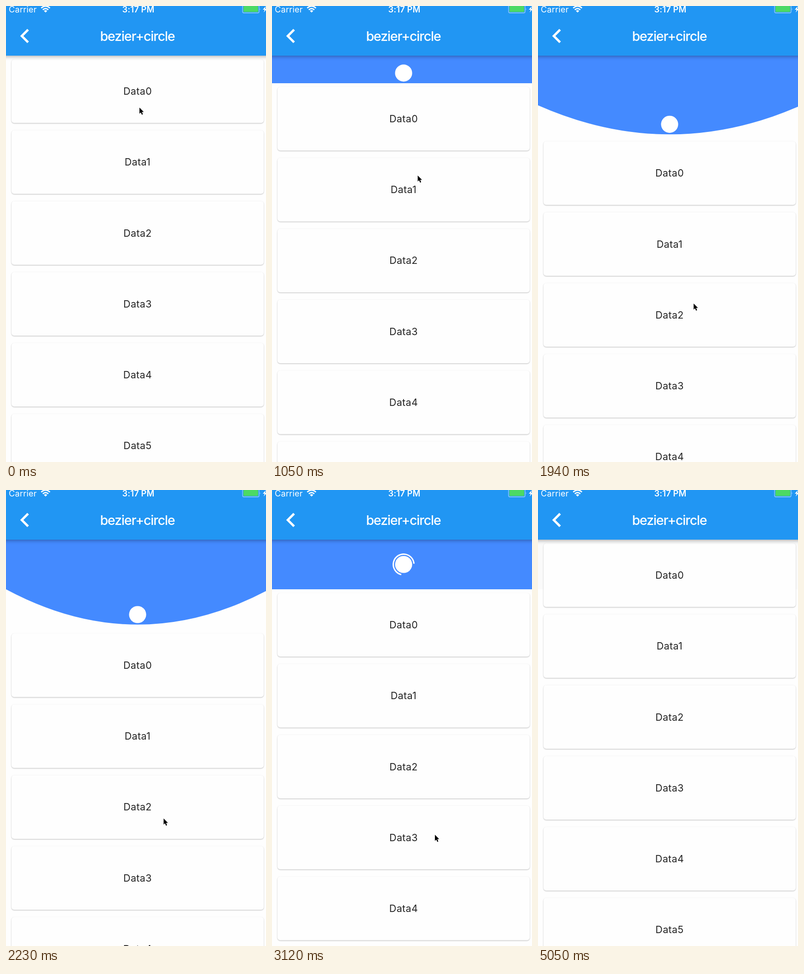
An HTML page for the animation above (5.8 s loop, 565x992 px).

```html
<!DOCTYPE html>
<html lang="en">
<head>
<meta charset="utf-8">
<title>bezier+circle</title>
<style>
  html, body { margin: 0; width: 100%; height: 100%; overflow: hidden; background: #fefefe; }
  svg { display: block; width: 565px; height: 992px; font-family: Inter, Roboto, sans-serif; }
  .card rect { fill: #fefefe; filter: drop-shadow(0 1.5px 1px rgba(0,0,0,.27)); }
  .card text { font-size: 21.4px; letter-spacing: .4px; fill: #242424; text-anchor: middle; }
  .bar { filter: drop-shadow(0 2px 4px rgba(0,0,0,.32)); }
  .status { font-size: 18.3px; fill: #fff; letter-spacing: .15px; }
  .title { font-size: 28.5px; font-weight: 500; letter-spacing: -1.15px; fill: #fff; text-anchor: middle; }
</style>
</head>
<body>
<svg viewBox="0 0 565 992">
  <rect width="565" height="992" fill="#fefefe"/>
  <rect id="stale" y="108" width="565" height="108" fill="#fafafa"/>
  <path id="band" fill="#448aff"/>
  <g id="ball">
    <circle r="18.6" fill="#fff"/>
    <circle id="ring" r="22.5" fill="none" stroke="#fff" stroke-width="3" pathLength="360"/>
  </g>
  <g id="list"></g>
  <rect class="bar" x="-20" y="-20" width="605" height="128" fill="#2196f3"/>
  <g class="status">
    <text x="6" y="13.5">Carrier</text>
    <text x="252.5" y="13.5" font-weight="600">3:17 PM</text>
  </g>
  <g fill="none" stroke="#fff" stroke-width="2.8">
    <path d="M76.5 4.5Q86 -4 95.5 4.5M80 8.3Q86 3 92 8.3"/>
    <path d="M82.3 10.5Q86 7.5 89.7 10.5L86 14.3z" fill="#fff" stroke="none"/>
  </g>
  <rect x="514" y="-1.5" width="36" height="16.5" rx="3" fill="none" stroke="#fff" stroke-opacity=".55" stroke-width="1.3"/>
  <rect x="516" y="0" width="32" height="13" rx="1.5" fill="#4cd964"/>
  <path d="M551.5 4.5q2 2.5 0 5z" fill="#fff" fill-opacity=".55"/>
  <path d="M565 0L558 8h4l-2 6 7-8h-4z" fill="#fff"/>
  <path d="M48 51.5L34.3 65.2 48 79" fill="none" stroke="#fff" stroke-width="5"/>
  <text class="title" x="285.5" y="76">bezier+circle</text>
  <path id="cursor" d="M0 0V13.2L3 10.4 5.2 15.6 7.5 14.6 5.3 9.6H9.4z" fill="#000" stroke="#fff" stroke-width="1" paint-order="stroke"/>
</svg>
<script>
const LOOP = 5800, STEP = 148.5;
const BAR = 108, REST = 108, PULL = 88;
const RELEASE = 2227, SPIN = 2353, DONE = 4250, CLOSE = 4540, CLOSED = 5000;
const $ = id => document.getElementById(id);

const pullKeys = [[280, 0], [742, 27.5], [1040, 60], [1485, 122.5], [2227, 196]];
const cursorX = [[0, 290], [742, 307.5], [1485, 330], [2227, 342.5], [3118, 354], [3420, 360], [4010, 496]];
const cursorY = [[0, 221], [742, 291], [1485, 510], [2227, 714.5], [3118, 750], [3420, 760], [4010, 1010]];

$('list').innerHTML = [0, 1, 2, 3, 4, 5].map(i =>
  `<g class="card" transform="translate(0 ${116 + 154.25 * i})">
    <rect x="12" width="548" height="138.5" rx="6"/><text x="286" y="77">Data${i}</text></g>`).join('');

// Smooth curve through [time, value] keys, at rest at both ends
function track(keys, t) {
  const last = keys.length - 1;
  if (t <= keys[0][0]) return keys[0][1];
  if (t >= keys[last][0]) return keys[last][1];
  const i = keys.findIndex(k => k[0] > t) - 1;
  const slope = j => j < 1 || j >= last ? 0 :
    (keys[j + 1][1] - keys[j - 1][1]) / (keys[j + 1][0] - keys[j - 1][0]);
  const [t0, a] = keys[i], [t1, b] = keys[i + 1];
  const d = t1 - t0, u = (t - t0) / d, v = 1 - u;
  return a * v * v * (1 + 2 * u) + b * u * u * (1 + 2 * v)
    + d * u * v * (slope(i) * v - slope(i + 1) * u);
}

// Critically damped return from 1 to 0
const spring = ms => {
  const x = Math.max(0, ms) * .014;
  return (1 + x) * Math.exp(-x);
};

// cubic-bezier(.4, 0, .2, 1)
function ease(x) {
  if (x <= 0) return 0;
  if (x >= 1) return 1;
  let lo = 0, hi = 1, u;
  for (let i = 0; i < 20; i++) {
    u = (lo + hi) / 2;
    const v = 1 - u;
    if (1.2 * v * v * u + .6 * v * u * u + u ** 3 < x) lo = u; else hi = u;
  }
  return u * u * (3 - 2 * u);
}

function spin(ms) {
  const turn = Math.floor(ms / 1333), p = ms / 1333 - turn;
  const head = ease(p * 2), tail = ease(p * 2 - 1);
  $('ring').setAttribute('stroke-dasharray', `${Math.max(.1, 270 * (head - tail))} 360`);
  $('ring').setAttribute('transform', `rotate(${-90 + 270 * tail + 306 * p - 144 * turn})`);
}

function draw(t) {
  let offset, bulge, ballY;
  if (t <= RELEASE) {
    offset = track(pullKeys, t);
    const over = Math.max(0, offset - REST);
    bulge = over - 11 * (over / PULL) ** 2;
    ballY = BAR + Math.min(offset, REST) + bulge - 22;
  } else {
    const s = (t - RELEASE) / 1000, back = spring(t - RELEASE);
    offset = t < CLOSE ? REST + PULL * back : t < CLOSED ? REST * spring(t - CLOSE) : 0;
    bulge = s < .85 ? 77 * Math.exp(-5.5 * s) * Math.cos(4 * Math.PI * s) : 0;
    ballY = 162 + 109 * back;
  }
  const edge = BAR + Math.min(offset, REST);
  $('band').setAttribute('d', `M0 ${BAR}V${edge}Q286 ${edge + 2 * bulge} 572 ${edge}V${BAR}z`);
  $('list').setAttribute('transform', `translate(0 ${offset})`);
  $('ball').setAttribute('transform', `translate(286 ${ballY})`);
  $('ball').style.display = t < DONE ? '' : 'none';
  $('ring').style.display = t >= SPIN ? '' : 'none';
  if (t >= SPIN) spin(t - SPIN);
  $('stale').style.display = t >= CLOSED ? '' : 'none';
  $('cursor').setAttribute('transform', `translate(${track(cursorX, t)} ${track(cursorY, t)})`);
}

function frame() {
  const t = performance.now() % LOOP;
  draw(Math.floor(t / STEP) * STEP);
  requestAnimationFrame(frame);
}
frame();
</script>
</body>
</html>
```
